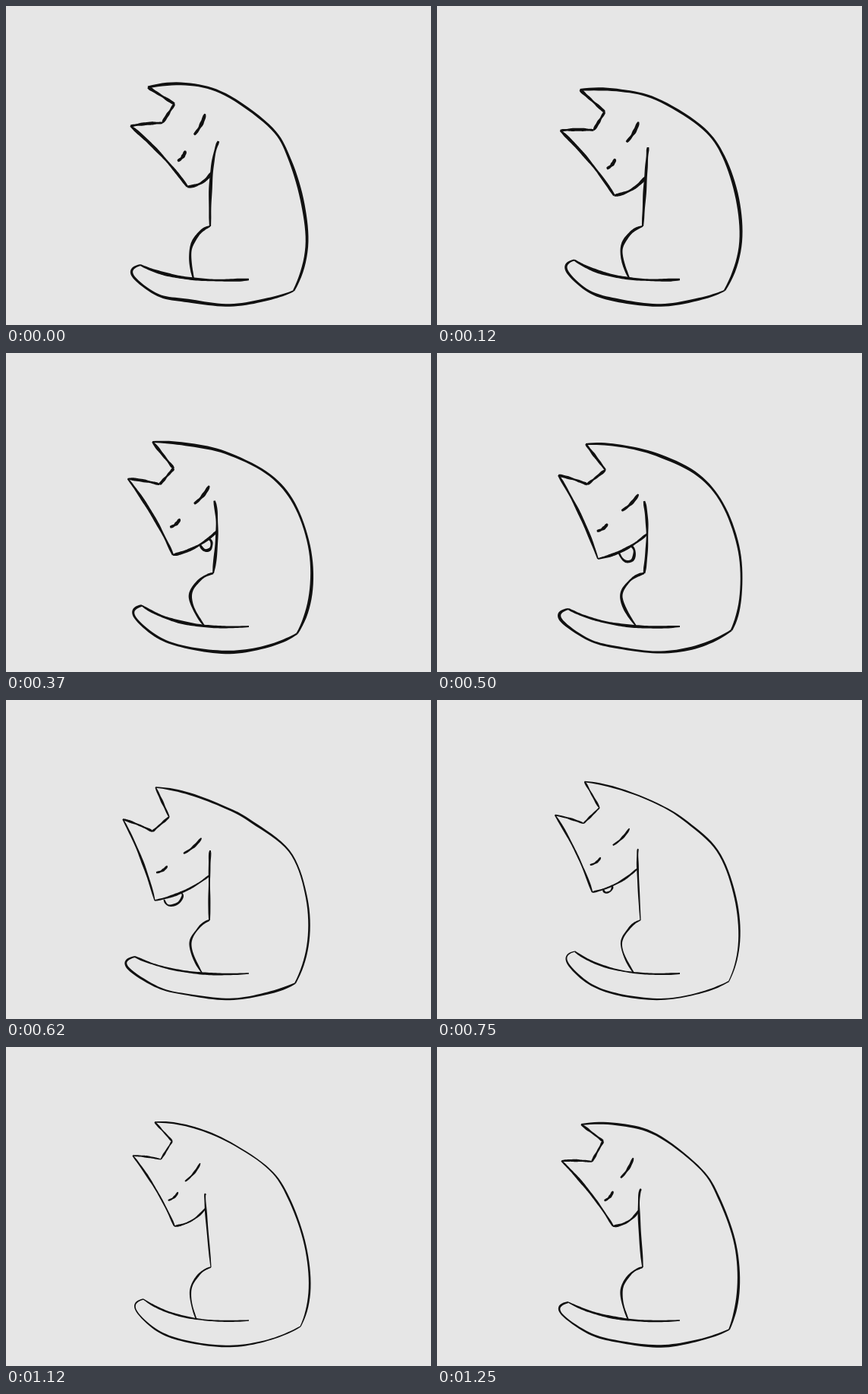
Recreate the animation shown at these times as an HTML page with a canvas. Size 560 by 420 pixels, loop 1.37 s.

```html
<!DOCTYPE html>
<html lang="en">
<head>
<meta charset="utf-8">
<title>Cat washing</title>
<style>
html, body { margin: 0; width: 100%; height: 100%; overflow: hidden; background: #e6e6e6; }
canvas { display: block; width: 560px; height: 420px; }
</style>
</head>
<body>
<canvas id="stage" width="560" height="420"></canvas>
<script>
const ctx = document.getElementById("stage").getContext("2d");
const INK = "#111", PAPER = "#e6e6e6", LOOP = 1370, STEPS = 60;

// Joints of the cat. top: heights of the back at x 240 and 290;
// side: its x at heights 160, 200, 260, 320; leg: x of knee and foot;
// tongue: place along the jaw, width, depth; turn: how far the face shows.
const lookUp = {
  pen: 3.7, turn: 1.03, earR: [187, 107], notchR: [222, 129], notchL: [206, 154], earL: [164, 158],
  chin: [239, 238], neck: [271, 219], throat: [280, 178], top: [103, 117], side: [349, 373, 391, 396],
  leg: [269, 247], tail: [177, 341], base: [379, 375], tongue: [.85, 0, 0]
};
const bend = {
  pen: 3.7, turn: 1.15, earR: [190, 114], notchR: [220, 150], notchL: [207, 173], earL: [161, 170],
  chin: [228, 261], neck: [279, 231], throat: [276, 194], top: [119, 129], side: [350, 384, 403, 402],
  leg: [273, 260], tail: [185, 328], base: [379, 374], tongue: [.85, 10, 7]
};
const lick = {
  pen: 3.4, turn: 1.06, earR: [196, 120], notchR: [222, 154], notchL: [198, 173], earL: [160, 161],
  chin: [212, 271], neck: [277, 238], throat: [273, 195], top: [122, 134], side: [343, 377, 398, 400],
  leg: [273, 262], tail: [173, 337], base: [388, 365], tongue: [.52, 19, 18]
};
const reach = {
  pen: 2.7, turn: 1.1, earR: [197, 115], notchR: [215, 154], notchL: [193, 173], earL: [154, 157],
  chin: [196, 264], neck: [268, 231], throat: [269, 198], top: [123, 142], side: [323, 374, 396, 398],
  leg: [268, 258], tail: [170, 338], base: [381, 373], tongue: [.3, 24, 12]
};
const rise = {
  pen: 2.1, turn: .9, earR: [192, 100], notchR: [213, 130], notchL: [193, 152], earL: [157, 146],
  chin: [213, 242], neck: [261, 212], throat: [261, 194], top: [111, 131], side: [334, 367, 390, 398],
  leg: [268, 260], tail: [193, 324], base: [388, 368], tongue: [.3, 0, 0]
};
const tuck = {
  pen: 2.3, turn: .86, earR: [196, 99], notchR: [219, 124], notchL: [204, 148], earL: [167, 143],
  chin: [222, 236], neck: [263, 212], throat: [263, 195], top: [104, 123], side: [346, 373, 394, 400],
  leg: [270, 251], tail: [181, 332], base: [388, 368], tongue: [.3, 0, 0]
};
const settle = {
  pen: 2.9, turn: .94, earR: [190, 102], notchR: [219, 124], notchL: [204, 151], earL: [164, 150],
  chin: [232, 236], neck: [266, 215], throat: [269, 187], top: [102, 116], side: [347, 372, 393, 397],
  leg: [271, 252], tail: [173, 336], base: [385, 372], tongue: [.3, 0, 0]
};

const mid = (a, b) => (a + b) / 2;

function between(a, b) {
  const pose = {};
  for (const key in a) {
    pose[key] = Array.isArray(a[key]) ? a[key].map((v, i) => mid(v, b[key][i])) : mid(a[key], b[key]);
  }
  return pose;
}

const beats = [
  [0, lookUp], [120, between(lookUp, bend)], [250, bend], [370, between(bend, lick)], [500, lick],
  [620, reach], [750, between(reach, rise)], [870, rise], [1000, between(rise, tuck)],
  [1120, tuck], [1250, settle]
];

// Point a given way along a, b and a distance off to its side.
function beside([ax, ay], [bx, by], way, off) {
  const dx = bx - ax, dy = by - ay, len = Math.hypot(dx, dy) || 1;
  return [ax + dx * way - dy / len * off, ay + dy * way + dx / len * off];
}

const arc = (a, b, bow) => [a, beside(a, b, .5, bow), b];

// Curve through all points; the ends are extended as parabolas.
function curve(pts) {
  const n = pts.length;
  const extend = (a, b, c) => a.map((v, i) => 3 * v - 3 * b[i] + c[i]);
  const p = [extend(pts[0], pts[1], pts[2]), ...pts, extend(pts[n - 1], pts[n - 2], pts[n - 3])];
  return Array.from({ length: STEPS + 1 }, (_, k) => {
    const u = k / STEPS * (n - 1), i = Math.min(n - 2, Math.floor(u)), t = u - i;
    return [0, 1].map(axis => {
      const [a, b, c, d] = p.slice(i, i + 4).map(q => q[axis]);
      return b + t / 2 * (c - a + t * (2 * a - 5 * b + 4 * c - d + t * (3 * (b - c) + d - a)));
    });
  });
}

// Brush ribbon whose pressure swells along the way and fades at both ends.
function stroke(pts, pen, seed) {
  const path = curve(pts), left = [], right = [];
  path.forEach(([x, y], i) => {
    const u = i / STEPS;
    const swell = .97 + .17 * Math.sin(8 * u + seed) + .1 * Math.sin(19 * u + 2.3 * seed);
    const half = pen / 2 * swell * Math.min(1, .65 + 5 * Math.min(u, 1 - u));
    const [ax, ay] = path[Math.max(0, i - 1)], [bx, by] = path[Math.min(STEPS, i + 1)];
    const len = Math.hypot(bx - ax, by - ay) || 1;
    const nx = (ay - by) / len * half, ny = (bx - ax) / len * half;
    left.push([x + nx, y + ny]);
    right.unshift([x - nx, y - ny]);
  });
  ctx.beginPath();
  left.concat(right).forEach(([x, y]) => ctx.lineTo(x, y));
  ctx.fill();
}

function eye(pose, along, across, slant, size) {
  const { chin, earL, turn } = pose;
  const way = along / Math.hypot(chin[0] - earL[0], chin[1] - earL[1]);
  const [x, y] = beside(chin, earL, way, across * turn);
  const angle = Math.atan2(chin[1] - earL[1], chin[0] - earL[0]) + slant;
  const dx = Math.cos(angle) * size / 2, dy = Math.sin(angle) * size / 2;
  return arc([x - dx, y - dy], [x + dx, y + dy], -2);
}

function tongue({ chin, neck, tongue: [place, width, depth] }) {
  const half = width / 2 / Math.hypot(neck[0] - chin[0], neck[1] - chin[1]);
  const at = (way, off) => beside(chin, neck, place + way * half, off);
  return [at(-1, 4), at(-.8, 4 + depth * .8), at(.2, 4 + depth), at(1, 4 + depth * .5), at(.9, 4)];
}

function drawCat(pose) {
  const { pen, earR, notchR, notchL, earL, chin, neck, throat, top, side, leg, tail, base } = pose;
  const knee = [leg[0], 290], foot = [leg[1], 359];
  const [tx, ty] = tail;
  const lines = [
    [earR, [240, top[0]], [290, top[1]], ...side.map((x, i) => [x, [160, 200, 260, 320][i]]), base],
    [tail, [tx - 10, ty + 14], [200, 370 + (ty - 327) * .75], [240, 388], [295, 394], [345, 386], base],
    [tail, [tx / 4 + 194, ty / 4 + 273], [320, 360]],
    arc(earR, notchR, 0),
    arc(notchR, notchL, 0),
    arc(notchL, earL, 1),
    arc(earL, chin, -3.5),
    arc(chin, neck, 5),
    [throat, neck, knee],
    [knee, [253, 301], [243, 323], foot]
  ];
  if (pose.tongue[2] > 5) lines.push(tongue(pose));
  lines.forEach((pts, i) => stroke(pts, pen, pen * 9 + i * 1.7));
  stroke(eye(pose, 49, 66, 1.23, 31), pen * 1.15, 5);
  stroke(eye(pose, 35, 21.5, 1.4, 17), pen * 1.15, 5);
}

const begin = performance.now();

function frame(now) {
  const t = Math.max(0, now - begin) % LOOP;
  const [, pose] = beats.filter(([start]) => start <= t).pop();
  ctx.fillStyle = PAPER;
  ctx.fillRect(0, 0, 560, 420);
  ctx.fillStyle = INK;
  drawCat(pose);
  requestAnimationFrame(frame);
}
frame(begin);
</script>
</body>
</html>
```
